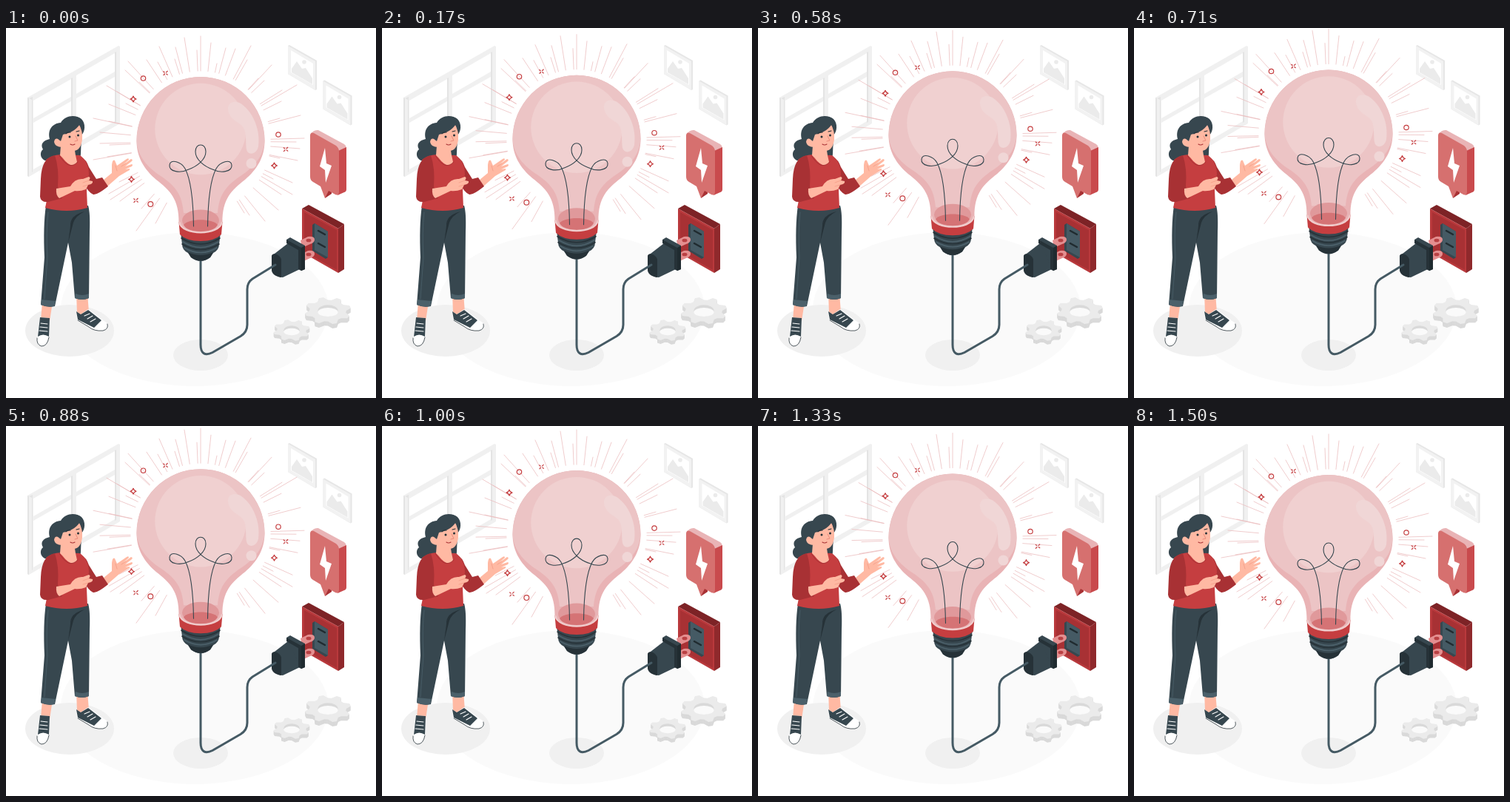
These frames come from a looping animation (500x500 px, 1.54 s). An HTML page:

```html
<!DOCTYPE html>
<html lang="en">
<head>
<meta charset="utf-8">
<title>Bright idea</title>
<style>
html, body { margin: 0; width: 100%; height: 100%; overflow: hidden; background: #fff; }
svg { display: block; width: 100%; height: 100%; }
.line { fill: none; stroke-linecap: round; stroke-linejoin: round; }
.skin { fill: #ffb9a3; }
.red { fill: #c53e40; }
.wine { fill: #a83134; }
.ink { fill: #263238; }
.slate { fill: #37474f; }
.white { fill: #fff; }
</style>
</head>
<body>
<svg viewBox="0 0 500 500">
  <defs>
    <path id="spark" d="M0-4Q.8-.8 4 0Q.8.8 0 4Q-.8.8-4 0Q-.8-.8 0-4Z"/>
    <path id="cross" d="M-2.800-2.200-1.200-1M2.700-2.700 1-1M-2.600 2.700-1 1M2.800 2.200 1.200 1"/>
    <g id="picture">
      <path fill="#e6e6e6" d="M0 1 2 0 39 21V60L37 61 0 39Z"/>
      <path fill="#f2f2f2" d="M0 1 37 22V61L0 39Z"/>
      <path class="white" d="M4 7 34 25V54L4 37Z"/>
      <path fill="#ebebeb" d="M5 37V32L12 22 19 32 24 31 33 45V53Z"/>
      <circle cx="22" cy="23" r="2.800" fill="#ebebeb"/>
    </g>
  </defs>

  <ellipse cx="255" cy="380" rx="181" ry="104" fill="#fafafa"/>
  <ellipse cx="86" cy="409" rx="60" ry="35" fill="#f0f0f0"/>
  <ellipse cx="263" cy="442" rx="37" ry="21" fill="#f0f0f0"/>

  <!-- window -->
  <path fill="#f0f0f0" d="M29 94 152 24 154 25V129L31 201 29 200Z"/>
  <path fill="#e4e4e4" d="M29 94 31 95V201L29 200ZM147 33 149 32V127L147 128ZM88 68 90 67V162L88 163ZM31 95 36 93V97L36 194 35 195V97Z"/>
  <path class="white" d="M37 98 88 69V93L37 122ZM95 64 147 34V59L95 89ZM37 128 88 99V162L37 191ZM95 95 147 66V126L95 156Z"/>

  <use href="#picture" x="381" y="23"/>
  <use href="#picture" x="428.500" y="70.500"/>
  <g id="gears"></g>

  <!-- speech bubble -->
  <path fill="#e9b4b6" d="M411 145Q415 137 422 138L457 157Q460 159 460 162L449 168Z"/>
  <path fill="#c94a4d" d="M449 166 460 161V218Q460 221 457 222L448 226Z"/>
  <path class="wine" d="M431 230 440 224V219L432 217Z"/>
  <path fill="#d6706f" d="M411 146Q411 140 416 142L446 159Q450 162 450 167V221Q450 227 445 225L436 220 431 230 425 214 415 208Q411 206 411 201Z"/>
  <path class="white" d="M431 162 424 187 431 192 432 209 440 186 433 183Z"/>

  <!-- outlet -->
  <path fill="#7d2326" d="M400 244 409 239 457 265 449 271Z"/>
  <path fill="#8f292c" d="M449 271 457 265V326L449 331Z"/>
  <path fill="#b9393c" d="M400 244 449 271V331L400 303Z"/>
  <path class="wine" d="M403 249 447 273V327L403 302Z"/>
  <path class="slate" d="M414 266 417 264 435 275V310L432 312 414 301Z"/>
  <path fill="#455a64" d="M417 264 435 275V310L417 300Z"/>
  <path class="line" stroke="#202b30" stroke-width="2.500" d="M422 274 431 279M422 291 431 296"/>

  <!-- plug and cable -->
  <g fill="#e48f90">
    <path d="M398 287 408 282Q417 281 417 286 417 290 411 292L400 297Z"/>
    <path d="M398 306 408 301Q417 300 417 305 417 309 411 311L400 316Z"/>
  </g>
  <g fill="#b94043"><ellipse cx="409" cy="287" rx="3.500" ry="2.300"/><ellipse cx="409" cy="306" rx="3.500" ry="2.300"/></g>
  <path class="slate" d="M359 308 381 291 399 301V325L374 337Q359 335 359 326Z"/>
  <path class="ink" d="M359 308Q360 304 366 306 372 309 372 314V337Q359 335 359 326Z"/>
  <path class="slate" d="M379 286 384 283 404 294V326L399 328Z"/>
  <path class="ink" d="M379 286 399 297V328L395 326V300L379 291Z"/>
  <path fill="#202b30" d="M399 297 404 294V326L399 328Z"/>
  <path class="line" stroke="#455a64" stroke-width="3" d="M263 290V428C263 440 269 443.500 279 438.500L317 416.500Q326 411 326 401V353Q326 344 333 339L364 320"/>

  <!-- floating bulb -->
  <g id="bulb">
    <path id="rays" class="line" stroke="#ebbbbc" stroke-width=".75"/>
    <g class="line" stroke="#c53e40" stroke-width="1.200">
      <circle cx="185.500" cy="68" r="3.200"/><circle cx="368" cy="144" r="3.200"/><circle cx="195.300" cy="238" r="3.400"/>
      <use href="#spark" x="172" y="96"/><use href="#spark" x="169.500" y="204.500"/><use href="#spark" x="362.500" y="186"/>
      <use href="#cross" x="215.500" y="61"/><use href="#cross" x="378" y="164"/><use href="#cross" x="175.500" y="233"/>
    </g>
    <path class="slate" d="M236 276H290L288 292Q288 300 280 304L276 310Q263 320 250 310L246 304Q238 300 238 292Z"/>
    <path class="ink" d="M246 303Q263 311 280 303L276 310Q263 319 250 310Z"/>
    <path class="line" stroke="#263238" stroke-width="1.600" d="M237 284Q263 300 289 284M238 292Q263 307 288 292"/>
    <path class="line" stroke="#4d626c" stroke-width="1.500" d="M239 289Q263 304 287 289M241 297Q263 310 285 297"/>
    <path class="red" d="M233.500 262H292.500L291 279Q282 288 263 288T235 279Z"/>
    <path fill="#e9b3b5" d="M263 66A86.500 86.500 0 0 1 349.500 152.500C349.500 175 339 191 323 205 305 219 292 231 292.500 263 289 281 237 281 233.500 263 234 231 221 219 203 205 187 191 176.500 175 176.500 152.500A86.500 86.500 0 0 1 263 66Z"/>
    <path fill="#ecc4c5" d="M263 66A86.500 86.500 0 0 1 349.500 152.500C348 174 335 188 317 200 296 214 288 226 286 250H240C238 226 230 214 209 200 191 188 178 174 176.500 152.500A86.500 86.500 0 0 1 263 66Z"/>
    <circle cx="263" cy="136.500" r="61.700" fill="#f0d0d0"/>
    <g fill="#f0d6d6">
      <path d="M300 110C299 100 310 96 320 104 335 116 344 139 341 160 339 171 327 173 325 164 323 150 327 136 315 129 307 124 301 119 300 110Z"/>
      <circle cx="331.500" cy="183" r="7"/>
    </g>
    <ellipse cx="263" cy="260" rx="25" ry="14.500" fill="#e0999b"/>
    <path fill="#d57375" d="M240 266C246 257 280 257 286 266 281 278 245 278 240 266Z"/>
    <path class="line" stroke="#f0cccc" stroke-width="2.200" d="M234.500 263C238 281 288 281 291.500 263"/>
    <path class="line" stroke="#37474f" stroke-width="1.100" d="M253.500 268C253 233 250 205 242 190 237 181 222 176 221 185 220 194 235 197 247 191 258 187 270 178 270 167 270 155 256 155 256 167 256 178 268 187 279 191 291 197 306 194 305 185 304 176 289 181 284 190 276 205 273 233 272.500 268"/>
  </g>

  <!-- woman -->
  <path class="slate" d="M74 128C80 117 95 117 102 123 108 129 107 140 102 145L101 170C101 176 97 178 92 176 80 183 66 183 58 180 47 180 44 169 50 164 46 157 50 152 59 150 56 138 62 129 74 128Z"/>
  <path class="skin" d="M95 357H110L112 385Q104 390 96 385ZM49 370H63L59 396 47 395Z"/>
  <path class="white" d="M95 383 101 387 111 380 137 399Q140 407 131 409 119 410 112 404L96 395ZM46 391 59 392 58 418Q56 430 48 430 41 428 42 419Z"/>
  <path class="slate" d="M95 383 101 387 111 381 129 395 119 405 97 394ZM46 391 59 392 58 417Q50 412 43 417Z"/>
  <path class="line" stroke="#263238" stroke-width=".8" d="M97 395 112 404Q119 410 131 409 139 407 137 400M42 419Q41 428 48 430 56 430 58 418"/>
  <path class="line" stroke="#fff" stroke-width="1.100" d="M106 389 113 386M110 393 117 389M114 397 121 393M47 399 56 400M46 404 56 405M45 409 56 410"/>
  <path class="slate" d="M54 240H111Q114 250 113 275L112 365Q103 369 93 365L89 317 84 290 66 376Q56 378 47 374L52 310Q50 267 54 240Z"/>
  <path class="ink" d="M106 248Q86 253 87 268L84 290 91 263Q94 254 106 248Z"/>
  <path fill="#4b606a" d="M48 367 67 369 65 376Q56 378 47 374ZM94 359Q103 363 112 359V365Q103 369 93 365Z"/>
  <path class="line" stroke="#4b606a" stroke-width=".8" d="M57 249Q54 275 56 310L52 366"/>
  <path class="skin" d="M132 205 143 196 143 185Q144 177 147 179L150 186 163 177Q166 175 166 178L158 185 169 177Q172 178 170 180L161 187 170 184Q172 185 170 187L161 191 167 190Q168 192 165 193L153 200 137 214Z"/>
  <path class="line" stroke="#ef927c" stroke-width=".6" d="M148 186 150 193M156 187 162 183"/>
  <path class="wine" d="M101 174Q109 178 112 188L122 204 130 202 138 214Q123 226 118 225 112 223 105 210Z"/>
  <path class="red" d="M74 171Q61 172 54 178 56 198 55 215L56 228 53 243Q82 251 110 243L109 219 112 198Q112 181 100 172Z"/>
  <path class="skin" d="M74 159 92 159 94 172 96 181Q89 192 76 175L73 172Z"/>
  <path class="line" stroke="#a83134" stroke-width="1" d="M72 172Q85 194 97 181"/>
  <path class="wine" d="M66 172Q48 175 47 204L46 228Q47 236 57 235L76 230 70 214Q72 190 66 172Z"/>
  <path class="skin" d="M68 217 87 214Q93 203 104 204L112 201Q115 202 112 206L117 207Q118 211 111 212L108 218Q100 221 93 220L72 230Q67 226 68 217Z"/>
  <path class="line" stroke="#ef927c" stroke-width=".6" d="M104 209 112 206M104 214 111 212"/>
  <path class="skin" d="M73 143Q91 143 98 129 104 139 103 151 101 165 92 166 82 166 76 161 66 161 65 154 66 147 73 151Z"/>
  <path class="slate" d="M71 139Q72 125 86 122 97 119 102 126 96 140 77 144L74 153 69 149Z"/>
  <g class="ink"><circle cx="86" cy="147" r="1.500"/><circle cx="97.500" cy="145" r="1.500"/></g>
  <path class="line" stroke="#263238" stroke-width="1.100" d="M81 143Q83 140 87 141M95 140 99 139"/>
  <path class="line" stroke="#e47f70" stroke-width=".8" d="M94 146 97 152 93 153"/>
  <path class="line" stroke="#a83134" stroke-width="1.100" d="M87 157Q90 159 93 157"/>
</svg>
<script>
const $ = id => document.getElementById(id);

// outer ends of the rays, all pointing at the bulb centre
const tips = [
  263,11, 241,13, 258,30, 277,20, 297,27, 285,48, 310,28, 331,24, 326,43, 359,50,
  341,68, 349,71, 393,77, 373,84, 372,99, 398,118, 370,122, 403,149, 392,154, 397,163,
  394,179, 370,176, 387,209, 361,204, 387,225, 372,225, 368,246, 350,261, 329,253, 322,250,
  176,274, 202,264, 183,244, 154,234, 139,224, 141,232, 153,208, 118,178, 137,174,
  127,156, 140,158, 127,141, 118,122, 139,126, 139,103, 162,102, 136,78, 150,86,
  165,45, 161,57, 180,73, 190,43, 207,25, 205,46, 228,42, 229,26
];
let rays = '';
for (let i = 0; i < tips.length; i += 2) {
  const [x, y] = [tips[i], tips[i + 1]];
  const k = 95 / Math.hypot(x - 263, y - 153);
  rays += `M${x} ${y}L${263 + (x - 263) * k} ${153 + (y - 153) * k}`;
}
$('rays').setAttribute('d', rays);

function gear(cx, cy, R, depth, teeth) {
  const ring = Array.from({ length: teeth * 4 }, (_, i) => {
    const a = (i + 2) / (teeth * 4) * 2 * Math.PI;
    const r = i % 4 < 2 ? R : R * .79;
    return `${cx + r * Math.cos(a)},${cy + r * .58 * Math.sin(a)}`;
  }).join(' ');
  let out = '';
  for (let d = depth; d >= 0; d--)
    out += `<polygon points="${ring}" transform="translate(0 ${d})" fill="${d ? '#d9d9d9' : '#ebebeb'}"/>`;
  const hole = (y, ry, fill) => `<ellipse cx="${cx}" cy="${y}" rx="${R * .43}" ry="${ry}" fill="${fill}"/>`;
  return out + hole(cy, R * .25, '#d9d9d9') + hole(cy + 2, R * .19, '#fafafa');
}
$('gears').innerHTML = gear(435, 382, 31.5, 6, 8) + gear(386, 408.5, 25, 5, 8);

const LOOP = 1540, FLOAT = 1500, LIFT = 10;

function draw(now) {
  const p = Math.min(now % LOOP / FLOAT, 1) * 2;
  const lift = p < 1 ? p : (2 - p) ** 1.3;
  $('bulb').setAttribute('transform', `translate(0 ${-LIFT * lift})`);
  requestAnimationFrame(draw);
}
draw(0);
</script>
</body>
</html>
```
